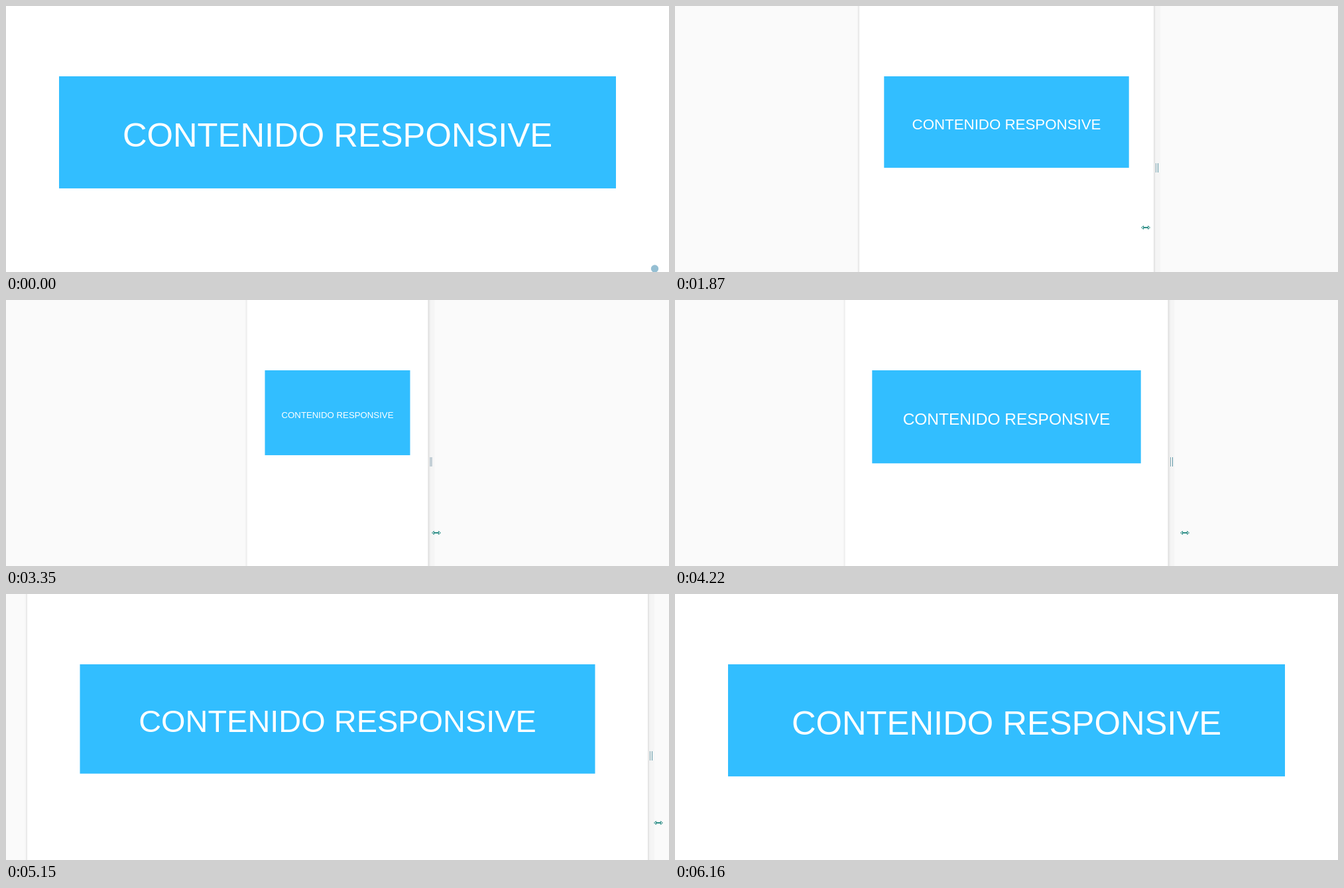
These frames come from a looping animation (1000x401 px, 7.32 s). An HTML page with a canvas:

```html
<!DOCTYPE html>
<html lang="es">
<head>
<meta charset="utf-8">
<title>Contenido responsive</title>
<style>
  html, body { margin: 0; width: 100%; height: 100%; overflow: hidden; background: #fff; }
  canvas { display: block; width: 1000px; height: 401px; }
</style>
</head>
<body>
<canvas id="stage" width="1000" height="401"></canvas>
<script>
const ctx = document.getElementById('stage').getContext('2d');
const W = 1000, H = 401, CENTER = 500, LOOP = 7320;

// time, steps since the previous key, half page width, half box width, pointer x, pointer y
const KEYS = [
  [0, 1, 505, 420, 985, 288],
  [700, 1, 505, 420, 985, 288],
  [780, 1, 503, 418, 985, 290],
  [1090, 4, 471, 392, 964, 309],
  [1490, 5, 358, 298, 851, 325],
  [1870, 5, 222, 184.7, 710, 334],
  [2260, 5, 141, 119, 634, 347],
  [2560, 4, 125, 101, 625, 349],
  [3190, 1, 126.5, 102, 632, 350],
  [3350, 2, 136.5, 109.5, 649, 351],
  [3890, 7, 213, 177, 727, 351],
  [4220, 4, 243.5, 202.7, 769, 351],
  [4690, 6, 373, 310, 897, 351],
  [5150, 6, 468, 388.5, 984, 345],
  [5470, 4, 486, 404, 1000, 340],
  [6160, 9, 505, 420, 1015, 335],
  [LOOP, 1, 505, 420, 1015, 335]
];

function tangent(i, col) {
  const a = KEYS[i - 1], b = KEYS[i], c = KEYS[i + 1];
  if (!a || !c || (b[col] - a[col]) * (c[col] - b[col]) <= 0) return 0;
  return (c[col] - a[col]) / (c[0] - a[0]);
}

// Smooth curve through the keys, sampled at the stepped rate of the drag.
function poseAt(time) {
  let i = 0;
  while (i < KEYS.length - 2 && time >= KEYS[i + 1][0]) i++;
  const a = KEYS[i], b = KEYS[i + 1], span = b[0] - a[0], steps = b[1];
  const p = Math.floor((time - a[0]) / span * steps + 0.05) / steps;
  const q = 1 - p;
  return [2, 3, 4, 5].map(col =>
    q * q * (1 + 2 * p) * a[col] + p * p * (3 - 2 * p) * b[col] +
    span * p * q * (q * tangent(i, col) - p * tangent(i + 1, col)));
}

function rect(x, y, w, h, color) {
  ctx.fillStyle = color;
  ctx.fillRect(x, y, w, h);
}

function drawPage(half) {
  const left = CENTER - half, right = CENTER + half;
  rect(0, 0, W, H, '#fafafa');
  rect(right, 0, 10, H, '#f5f5f5');
  ctx.save();
  ctx.shadowColor = 'rgba(0,0,0,.2)';
  ctx.shadowBlur = 4;
  rect(left, -10, half * 2, H + 20, '#fff');
  ctx.restore();
}

function drawHandle(half, filled) {
  const x = Math.round(CENTER + half) + 3;
  if (filled) {
    rect(x - 1, 237, 4, 14, '#c3cfd6');
  } else {
    rect(x, 237, 1, 14, '#7da6b2');
    rect(x + 3, 237, 1, 14, '#5c97a6');
  }
}

function drawBox(half) {
  const width = half * 2;
  rect(CENTER - half, 106, width, 113.5 + width * 0.066, '#32beff');
  ctx.fillStyle = '#fff';
  ctx.font = `${width * 0.0604}px "Liberation Sans", Arial, sans-serif`;
  ctx.textAlign = 'center';
  ctx.fillText('CONTENIDO RESPONSIVE', CENTER, 166.2 + width * 0.054);
}

function drawPointer(x, y) {
  ctx.save();
  ctx.translate(Math.round(x), Math.round(y));
  ctx.strokeStyle = '#2f8f88';
  ctx.lineWidth = 1;
  ctx.beginPath();
  for (const side of [-1, 1]) {
    ctx.moveTo(side * 3.5, -2.5);
    ctx.lineTo(side * 6.5, 0);
    ctx.lineTo(side * 3.5, 2.5);
    ctx.closePath();
  }
  ctx.stroke();
  rect(-3, -1, 6, 2, '#2f8f88');
  ctx.restore();
}

function draw(time) {
  const [page, box, x, y] = poseAt(time);
  drawPage(page);
  drawBox(box);
  if (time < 70) {
    ctx.fillStyle = '#95bfd3';
    ctx.beginPath();
    ctx.arc(978.5, 396, 5.7, 0, Math.PI * 2);
    ctx.fill();
  }
  if (time >= 780 && time < 6160) {
    drawHandle(page, time >= 3190 && time < 3430);
    drawPointer(x, y);
  }
}

const start = performance.now();
function tick() {
  draw((performance.now() - start) % LOOP);
  requestAnimationFrame(tick);
}
tick();
</script>
</body>
</html>
```
